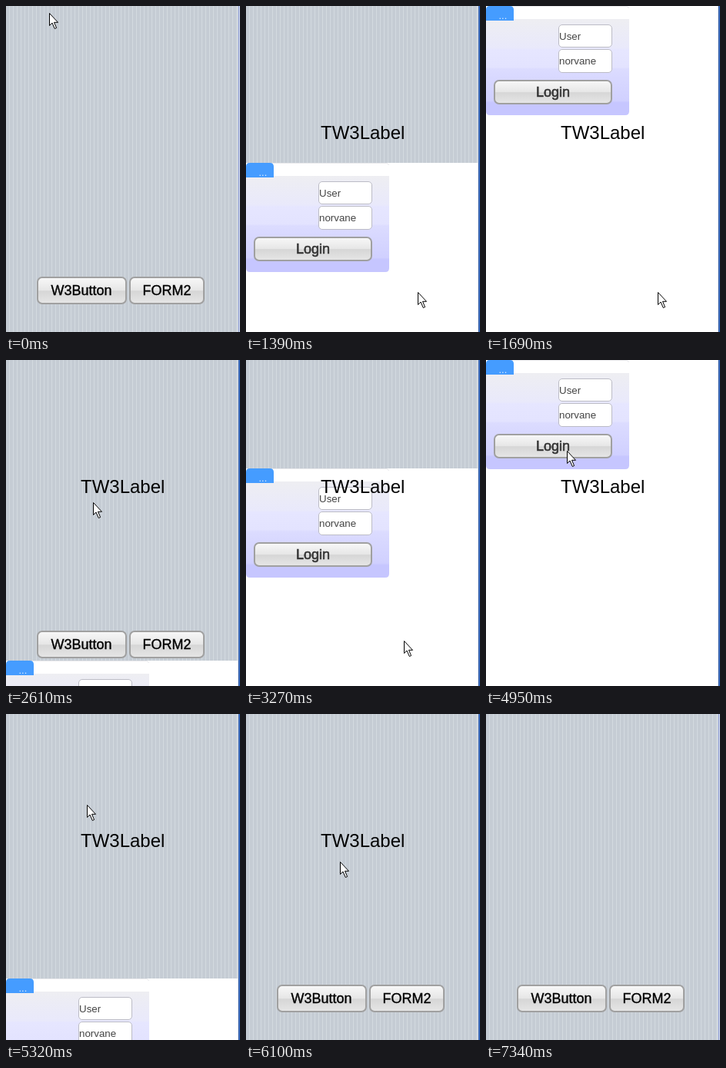
An HTML page for the animation above (8000 ms loop, 304 by 424 pixels).

```html
<!DOCTYPE html>
<html lang="en">
<head>
<meta charset="utf-8">
<title>Form transition</title>
<style>
  html, body { margin: 0; width: 304px; height: 424px; overflow: hidden; background: #fff; }
  svg { display: block; }
  text { font-family: "Liberation Sans", Arial, sans-serif; white-space: pre; }
  .caption { font-size: 18px; fill: #000; stroke: #000; stroke-width: .35px; }
  .login { fill: #333; stroke: #333; stroke-width: .6px; }
  .entry { font-size: 13.333px; fill: #444; }
  .button { fill: url(#metal); stroke: #a0a0a0; stroke-width: 2; }
  .field { fill: #fff; stroke: #bcbcc6; }
</style>
</head>
<body>
<svg width="304" height="424" viewBox="0 0 304 424">
  <defs>
    <pattern id="pinstripe" width="5" height="8" patternUnits="userSpaceOnUse">
      <rect width="5" height="8" fill="#c5ccd4"/>
      <rect x="4" width="1" height="8" fill="#d3dae0"/>
    </pattern>
    <linearGradient id="metal" x2="0" y2="1">
      <stop offset="0" stop-color="#f8f8f8"/>
      <stop offset=".5" stop-color="#e6e6e6"/>
      <stop offset=".52" stop-color="#d6d6d6"/>
      <stop offset="1" stop-color="#e6e6e6"/>
    </linearGradient>
    <linearGradient id="lilac" x2="0" y2="1">
      <stop offset="0" stop-color="#eeeef2"/>
      <stop offset=".3" stop-color="#e9e9fb"/>
      <stop offset=".32" stop-color="#e6e6ff"/>
      <stop offset=".5" stop-color="#e3e3ff"/>
      <stop offset=".52" stop-color="#dcdcff"/>
      <stop offset=".62" stop-color="#d8d8ff"/>
      <stop offset=".85" stop-color="#d0d0ff"/>
      <stop offset=".87" stop-color="#c6c6ff"/>
      <stop offset="1" stop-color="#c6c6ff"/>
    </linearGradient>
  </defs>

  <rect width="301" height="424" fill="url(#pinstripe)"/>
  <rect class="button" x="41" y="353" width="115" height="34" rx="6"/>
  <text class="caption" x="58.5" y="376">W3Button</text>
  <rect class="button" x="161" y="353" width="96" height="34" rx="6"/>
  <text class="caption" x="177.5" y="376">FORM2</text>

  <g id="form">
    <rect width="301" height="424" fill="#fff"/>
    <path d="M2 .5H182Q185 .5 185.5 3" fill="none" stroke="#e9e9ec"/>
    <path d="M0 17H186V137Q186 142 181 142H5Q0 142 0 137Z" fill="url(#lilac)"/>
    <path d="M0 19V5Q0 0 5 0H31Q36 0 36 5V19Z" fill="#459cff"/>
    <text x="16.5" y="17" font-size="13" fill="#d8eaff">...</text>
    <rect class="field" x="94.5" y="24.5" width="69" height="29" rx="4.5"/>
    <text class="entry" x="95" y="44">User</text>
    <rect class="field" x="94.5" y="56.5" width="69" height="30" rx="4.5"/>
    <text class="entry" x="95" y="76">norvane</text>
    <rect class="button" x="11" y="97" width="152" height="30" rx="6"/>
    <text class="caption login" x="65" y="118">Login</text>
  </g>

  <text id="label" x="97" y="173" font-size="24">TW3Label</text>

  <rect x="301" width="1" height="424" fill="#dfe5ee"/>
  <rect id="edge" x="302" width="1" height="424"/>
  <rect id="rim" x="303" width="1" height="424"/>

  <path id="cursor" d="M.5 .5V16.5L4 13L7.3 20.5L9.6 19.5L6.5 12.3H11.5Z" fill="#fff" stroke="#000"/>
</svg>
<script>
const LOOP = 8000, HEIGHT = 424, SLIDE = 357;
const byId = id => document.getElementById(id);
const form = byId('form'), label = byId('label'), cursor = byId('cursor');
const edge = byId('edge'), rim = byId('rim');

// start time, and where the form ends up
const slides = [[1282, 0], [2374, HEIGHT], [3131, 0], [5138, HEIGHT]];

// time, x, y of the pointer tip
const path = [
  [60, 56, 9], [420, 150, 190], [780, 237, 403], [960, 223, 372],
  [1820, 223, 372], [2130, 88, 114], [2400, 88, 114], [2610, 113, 185],
  [2950, 205, 365], [3510, 205, 365], [3990, 52, 47], [4350, 52, 47],
  [4710, 105, 118], [5320, 105, 118], [5920, 122, 192]
];

// The screen refreshes every 60 ms, with a few 10 ms delays
const delays = [960, 1750, 2200, 4700];
function tick(t) {
  const shift = 10 * delays.filter(d => t >= d).length;
  return Math.floor((t - shift) / 60) * 60 + shift;
}

// cubic-bezier(.25, .1, .25, 1)
function ease(x) {
  const curve = (s, a, b) => 3 * s * (1 - s) ** 2 * a + 3 * s * s * (1 - s) * b + s ** 3;
  let low = 0, high = 1;
  for (let i = 0; i < 24; i++) {
    const mid = (low + high) / 2;
    if (curve(mid, .25, .25) < x) low = mid; else high = mid;
  }
  return curve(low, .1, 1);
}

function formTop(t) {
  let top = HEIGHT;
  for (const [start, end] of slides) {
    if (t >= start) top += (end - top) * ease(Math.min(1, (t - start) / SLIDE));
  }
  return Math.round(top);
}

function pointer(t) {
  const next = path.findIndex(p => p[0] > t);
  if (next < 1) return (next ? path[path.length - 1] : path[0]).slice(1);
  const [t0, x0, y0] = path[next - 1], [t1, x1, y1] = path[next];
  const k = (t - t0) / (t1 - t0);
  return [Math.round(x0 + (x1 - x0) * k), Math.round(y0 + (y1 - y0) * k)];
}

const show = (el, on) => el.setAttribute('visibility', on ? 'visible' : 'hidden');

function draw(time) {
  const t = tick(time);
  form.setAttribute('transform', `translate(0 ${formTop(t)})`);
  cursor.setAttribute('transform', `translate(${pointer(t)})`);
  show(cursor, t < 6340);
  show(label, t >= 1282 && t < 6280);
  const active = t >= 960 && time < 7340;
  edge.setAttribute('fill', active ? '#1c4a9e' : '#7a8bc8');
  rim.setAttribute('fill', active ? '#4a7bc8' : '#dfe6f4');
}

const begin = performance.now();
function frame() {
  draw((performance.now() - begin) % LOOP);
  requestAnimationFrame(frame);
}
frame();
</script>
</body>
</html>
```
